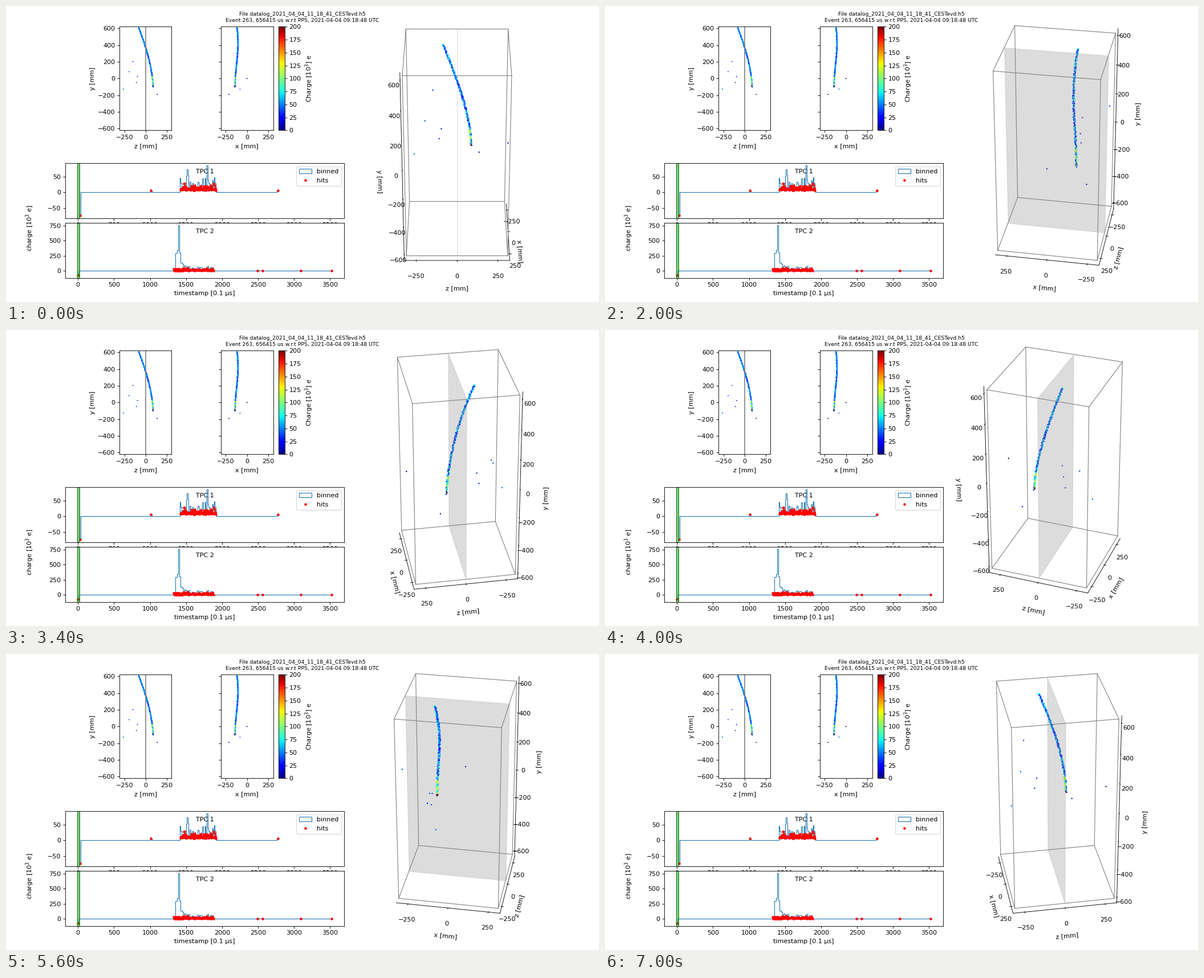
Write a matplotlib script that moves like this. It is 1040 px wide and 520 px high and loops after 7200 ms.

```python
import itertools

import numpy as np
import matplotlib.pyplot as plt
from matplotlib.animation import FuncAnimation
from mpl_toolkits.mplot3d.art3d import Poly3DCollection

W, H, DPI = 1040, 520, 80
FRAMES, INTERVAL = 36, 200
HALF_X, HALF_Y = 310, 620
TICKS_X, TICKS_Y = [-250, 0, 250], range(-600, 601, 200)
COLORS = dict(cmap="jet", vmin=0, vmax=200)

plt.rcParams.update({"font.family": "DejaVu Sans", "font.size": 10})
rng = np.random.default_rng(263)
fig = plt.figure(figsize=(W / DPI, H / DPI), dpi=DPI)


def add_axes(left, top, right, bottom, **kwargs):
    """Axes from pixel edges measured from the top left corner."""
    box = [left / W, 1 - bottom / H, (right - left) / W, (bottom - top) / H]
    return fig.add_axes(box, **kwargs)


def make_track(n=340):
    """A curved track that stops at its lower end with a charge peak."""
    u = np.linspace(1, 0, n)
    y = -100 + 710 * u
    dx, dz = rng.uniform(-5, 5, (2, n))
    x = -140 + 34 * np.sin(2.15 * u) ** 2 + dx
    z = 88 - 172 * u ** 1.65 + dz
    q = rng.uniform(18, 82, n)
    core = dz < 1
    q += 55 * (core & (y < 25) & (y > -80))
    q[core & (y < -88)] = 200
    return np.array([x, y, z, q])


def make_strays():
    """Single hits away from the track."""
    x, y, z = np.transpose([
        (-305, 204, -150), (-131, 82, -197), (-135, 24, -97), (-138, -48, -110),
        (-82, -126, -265), (-213, -190, 139), (0, 0, 311),
    ])
    return np.array([x, y, z, 24 - z / 14])


def draw_projection(ax, horizontal, label):
    points = ax.scatter(horizontal, hit_y, c=hit_q, s=1.2, lw=0.6, **COLORS)
    ax.set(xlim=(-HALF_X, HALF_X), ylim=(-HALF_Y, HALF_Y),
           xticks=TICKS_X, yticks=TICKS_Y, xlabel=label)
    return points


def draw_waveform(ax, name, edges, binned, t, q, strays, ylim, yticks):
    """Binned charge and single hits; the first bin holds the negative pulse."""
    centres = (edges[:-1] + edges[1:]) / 2
    binned[0] = -75
    binned[np.searchsorted(edges, strays) - 1] = 6
    ax.hist(centres, bins=edges, weights=binned, histtype="step", label="binned")
    times = np.concatenate([t, strays, [edges[0] + 1]])
    charges = np.concatenate([q, np.full(len(strays), 6), [-74]])
    ax.plot(times, charges, "r.", label="hits")
    for pulse in (0, 25):
        ax.axvline(pulse, color="g")
    ax.text(0.5, 0.9, name, transform=ax.transAxes, ha="center", va="top")
    ax.set(xlim=(-176, 3697.5), ylim=ylim, xticks=range(0, 3501, 500), yticks=yticks)


def draw_detector(ax):
    size = np.array([HALF_X, HALF_X, HALF_Y])
    corners = size * np.array(list(itertools.product((-1, 1), repeat=3)))
    for a, b in itertools.combinations(corners, 2):
        if np.count_nonzero(a != b) == 1:
            ax.plot(*zip(a, b), color="gray", lw=1)
    x, y = HALF_X, HALF_Y
    cathode = [(-x, 0, -y), (x, 0, -y), (x, 0, y), (-x, 0, y)]
    shade = (0.5, 0.5, 0.5, 0.27)
    ax.add_collection3d(Poly3DCollection([cathode], facecolors=[shade],
                                         edgecolors=[shade], linewidths=0.8))


hit_x, hit_y, hit_z, hit_q = np.hstack([make_track(), make_strays()])

fig.suptitle("File datalog_2021_04_04_11_18_41_CESTevd.h5\n"
             "Event 263, 656415 us w.r.t PPS, 2021-04-04 09:18:48 UTC", size="small")

# Side and front projections
ax_zy = add_axes(199.3, 36.4, 290.4, 218.4)
draw_projection(ax_zy, hit_z, "z [mm]")
ax_zy.set_ylabel("y [mm]")
ax_zy.axvline(0, color="gray")
ax_xy = add_axes(376.5, 36.4, 468.6, 218.4)
points = draw_projection(ax_xy, hit_x, "x [mm]")
ax_xy.tick_params(labelleft=False)
bar = fig.colorbar(points, cax=add_axes(478.4, 36.4, 488.6, 218.4), ticks=range(0, 201, 25))
bar.set_label("Charge [$10^3$] e")

# Upper half: uneven bursts while the track drifts in
edges = np.linspace(25, 2775, 221)
active = (edges[:-1] > 1405) & (edges[:-1] < 1905)
binned = active * np.clip(rng.gamma(1.6, 22, active.size), 0, 86)
t = rng.uniform(1412, 1910, 125)
q = np.minimum(6 + rng.gamma(1.5, 4.5, t.size), 28)
ax_top = add_axes(104, 276, 593.3, 372.6)
draw_waveform(ax_top, "TPC 1", edges, binned, t, q, [1015, 1915, 2774],
              (-83, 94), [-50, 0, 50])
ax_top.legend(loc="upper right")

# Lower half: one sharp peak with a decaying tail
edges = np.linspace(0, 3521.5, 201)
mid = (edges[:-1] + edges[1:]) / 2
peak = 340 * np.exp(-((mid - 1391) / 34) ** 8) + 420 * np.exp(-((mid - 1400) / 8) ** 2)
tail = rng.uniform(20, 75, mid.size) + 120 * np.exp(-np.abs(mid - 1430) / 45)
binned = peak + tail * ((mid > 1425) & (mid < 1880))
t = np.append(rng.uniform(1325, 1880, 130), rng.normal(1410, 28, 60))
q = np.minimum(4 + rng.gamma(1.5, 7, t.size), 48)
ax_bottom = add_axes(104, 381, 593.3, 477.6)
draw_waveform(ax_bottom, "TPC 2", edges, binned, t, q, [2490, 2565, 3090, 3521],
              (-116, 795), range(0, 751, 250))
ax_bottom.set_xlabel("timestamp [0.1 µs]")
fig.text(0.04, 0.25, "charge [$10^3$ e]", rotation=90, ha="center", va="center")

# Rotating view of the detector
ax_3d = add_axes(564, 25.6, 1006, 467.6, projection="3d")
ax_3d.patch.set_visible(False)
ax_3d.grid(False)
draw_detector(ax_3d)
ax_3d.scatter(hit_x, hit_z, hit_y, c=hit_q, s=2.2, lw=0.6, depthshade=False, **COLORS)
lim_x, lim_y = (np.array([-half, half]) * 25 / 24 for half in (HALF_X, HALF_Y))
ax_3d.set(xlim=lim_x, ylim=lim_x, zlim=lim_y,
          xticks=TICKS_X, yticks=TICKS_X, zticks=TICKS_Y,
          xlabel="x [mm]", ylabel="z [mm]")
ax_3d.set_zlabel("y [mm]", labelpad=20)
ax_3d.set_box_aspect((1, 1, 2))
for axis in (ax_3d.xaxis, ax_3d.yaxis, ax_3d.zaxis):
    axis.pane.set_visible(False)


def update(frame):
    azim = 360 * frame / FRAMES
    # A tiny offset keeps the axis side well defined in edge-on views
    nudge = 1e-3 * np.cos(np.radians(azim + 45))
    ax_3d.view_init(elev=30, azim=azim + nudge)
    return []


anim = FuncAnimation(fig, update, frames=FRAMES, interval=INTERVAL,
                     repeat=True, repeat_delay=0, blit=False)
plt.show()
```
